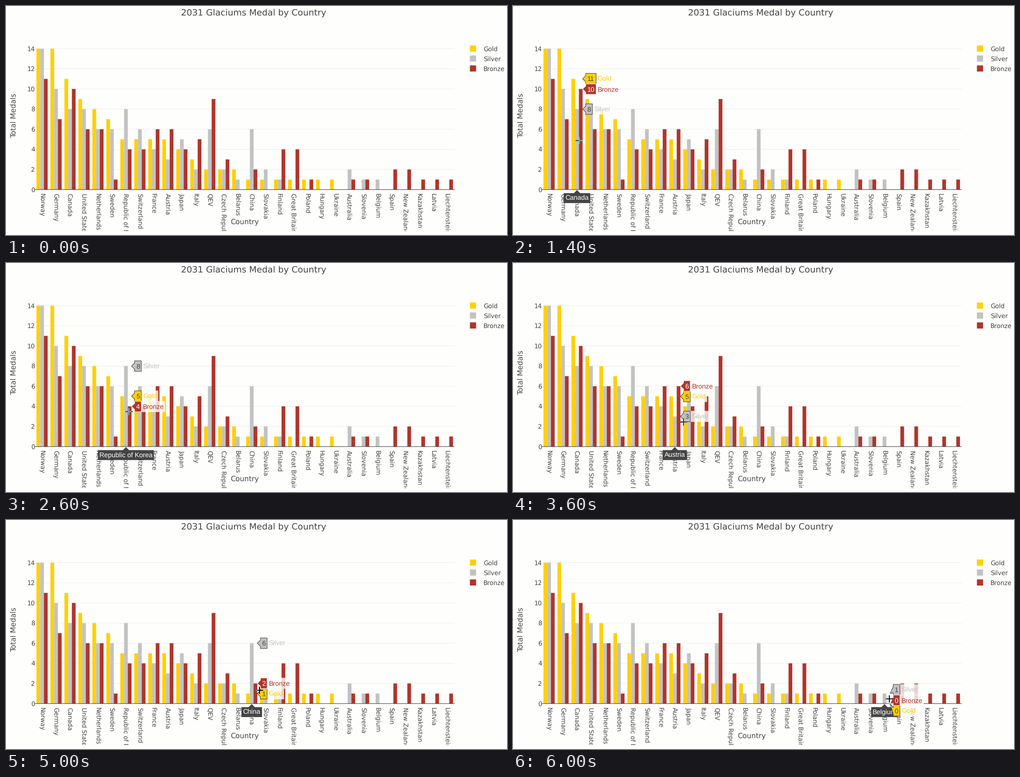
A matplotlib script that plays this animation: 1105x507 px, repeating every 6200 ms.

```python
import numpy as np
import matplotlib.pyplot as plt
from matplotlib.animation import FuncAnimation
from matplotlib.collections import LineCollection
from matplotlib.colors import to_rgb
from matplotlib.patches import Polygon, Rectangle
from matplotlib.textpath import TextPath

W, H, DPI = 1105, 507, 64
FRAMES, INTERVAL = 31, 200

PAPER, INK, GRID = "#fefefd", "#444444", "#eeeeee"
MEDALS = [("Gold", "#ffd005"), ("Silver", "#c2c2c2"), ("Bronze", "#b0352b")]
RESULTS = [
    ("Norway", 14, 14, 11), ("Germany", 14, 10, 7), ("Canada", 11, 8, 10),
    ("United States", 9, 8, 6), ("Netherlands", 8, 6, 6), ("Sweden", 7, 6, 1),
    ("Republic of Korea", 5, 8, 4), ("Switzerland", 5, 6, 4),
    ("France", 5, 4, 6), ("Austria", 5, 3, 6), ("Japan", 4, 5, 4),
    ("Italy", 3, 2, 5), ("QEV", 2, 6, 9), ("Czech Republic", 2, 2, 3),
    ("Belarus", 2, 1, 0), ("China", 1, 6, 2), ("Slovakia", 1, 2, 0),
    ("Finland", 1, 1, 4), ("Great Britain", 1, 0, 4), ("Poland", 1, 0, 1),
    ("Hungary", 1, 0, 0), ("Ukraine", 1, 0, 0), ("Australia", 0, 2, 1),
    ("Slovenia", 0, 1, 1), ("Belgium", 0, 1, 0), ("Spain", 0, 0, 2),
    ("New Zealand", 0, 0, 2), ("Kazakhstan", 0, 0, 1), ("Latvia", 0, 0, 1),
    ("Liechtenstein", 0, 0, 1),
]

LEFT, RIGHT, BASE, UNIT = 64.1, 989, 406.5, 312 / 14
STEP = (RIGHT - LEFT) / len(RESULTS)
BAR = STEP * 0.8 / 3

# Hover labels: font size, padding, arrow size and label height.
HOVER, PAD, ARROW, TALL = 14.7, 3.4, 6.8, 23.3

# Pointer stops: time step, x, y, hovered country.
STOPS = np.array([
    (2, 74, 284, 0), (4, 80, 287, 0), (9, 190, 305, 4), (13, 271, 329, 6),
    (18, 376, 352, 9), (25, 559, 377, 15), (30, 830, 396, 24),
])

# Unhinted glyphs keep fractional letter spacing.
plt.rcParams["text.hinting"] = "no_hinting"

fig = plt.figure(figsize=(W / DPI, H / DPI), dpi=DPI, facecolor=PAPER)
ax = fig.add_axes([0, 0, 1, 1])
ax.set_xlim(0, W)
ax.set_ylim(H, 0)
ax.axis("off")


def points(px):
    return px * 72 / DPI


def write(x, y, text, size, color=INK, family="DejaVu Sans", z=4, **kw):
    return ax.text(x, y, text, fontsize=points(size), color=color,
                   family=family, va="baseline", rotation_mode="anchor",
                   zorder=z, **kw)


def box(x, y, w, h, color, z, **kw):
    return ax.add_patch(Rectangle((x, y), w, h, facecolor=color, lw=0,
                                  zorder=z, snap=False, **kw))


def center(i):
    return LEFT + STEP * (i + 0.5)


def level(value):
    return BASE - UNIT * value


def draw_chart():
    write(546.5, 21, "2031 Glaciums Medal by Country", 19.2, ha="center")
    write(526.5, 484, "Country", 15.8, ha="center")
    write(21.5, 243, "Total Medals", 16, ha="center", rotation=90)

    for value in range(0, 15, 2):
        y = level(value)
        write(63.5, y + 5, str(value), 13.6, ha="right")
        ax.plot([LEFT, RIGHT], [y, y], color=INK if value == 0 else GRID,
                lw=points(1.13), zorder=3 if value == 0 else 1, snap=False)

    view = Rectangle((0, 0), W, 498, transform=ax.transData)
    for i, (country, *counts) in enumerate(RESULTS):
        label = write(center(i) - 5.3, 415, country, 13.55, rotation=270,
                      ha="left", clip_on=True)
        label.set_clip_path(view)
        for k, count in enumerate(counts):
            if count:
                box(center(i) + (k - 1.5) * BAR, level(count), BAR,
                    UNIT * count, MEDALS[k][1], 2)

    for k, (medal, color) in enumerate(MEDALS):
        y = 94.3 + 22 * k
        box(1023.2, y - 6.8, 13.6, 13.6, color, 2)
        write(1053, y + 5, medal, 13.6)


def text_width(text):
    path = TextPath((0, 0), text, size=HOVER, prop={"family": "Liberation Sans"})
    return path.get_extents().width + 1


def hover_text(x, y, text, color, z, ha="center"):
    return write(x, y + 5.3, text, HOVER, color, "Liberation Sans", z, ha=ha)


def spread(counts):
    """Label heights, with overlapping labels pushed apart around their mean."""
    order = sorted(range(3), key=lambda k: (-counts[k], -k))
    groups = []
    for rank, k in enumerate(order):
        groups.append([level(counts[k]) - TALL * rank])
        while len(groups) > 1 and np.mean(groups[-2]) > np.mean(groups[-1]):
            last = groups.pop()
            groups[-1] += last
    flat = [np.mean(g) for g in groups for _ in g]
    return {k: flat[rank] + TALL * rank for rank, k in enumerate(order)}


def country_label(i):
    x, name = center(i), RESULTS[i][0]
    half = text_width(name) / 2 + PAD
    top, bottom = BASE + ARROW + 1, BASE + ARROW + 23
    shape = [(x, BASE + 1), (x + ARROW, top), (x + half, top),
             (x + half, bottom), (x - half, bottom), (x - half, top),
             (x - ARROW, top)]
    patch = ax.add_patch(Polygon(shape, facecolor=INK, lw=0, zorder=10,
                                 snap=False))
    return [patch, hover_text(x, 425, name, "white", 11)]


def medal_label(x, count, y, k):
    medal, color = MEDALS[k]
    z = 12 + 3 * k
    dark = k < 2
    tip = level(count)
    x0 = x + ARROW
    wide = text_width("0" * len(str(count))) + 2 * PAD
    x1 = x0 + wide
    top, bottom = y - TALL / 2, y + TALL / 2
    shape = [(x, tip), (x0, y + ARROW), (x0, bottom), (x1, bottom),
             (x1, top), (x0, top), (x0, y - ARROW)]
    back = box(x1, top - 0.5, text_width(medal) + 2 * PAD, TALL + 1,
               PAPER, z, alpha=0.8)
    flag = ax.add_patch(Polygon(shape, facecolor=color, lw=points(1.13),
                                edgecolor=INK if dark else PAPER,
                                zorder=z + 1, snap=False))
    return [back, flag,
            hover_text(x0 + wide / 2, y, str(count),
                       INK if dark else "white", z + 2),
            hover_text(x1 + PAD, y, medal, color, z + 2, "left")]


def color_at(x, y):
    for i, (_, *counts) in enumerate(RESULTS):
        k = int(np.floor((x - center(i)) / BAR + 1.5))
        if 0 <= k < 3 and level(counts[k]) <= y < BASE:
            return MEDALS[k][1]
    return PAPER


def pointer(x, y):
    """Crosshair that inverts the colours of the bars below it."""
    cells = []
    for d in range(-8, 8):
        cells.append([(x + d, y), (x + d + 1, y)])
        cells.append([(x, y + d), (x, y + d + 1)])
    colors = [[1 - c for c in to_rgb(color_at(*np.mean(cell, axis=0)))]
              for cell in cells]
    cross = LineCollection(cells, colors=colors, linewidths=points(2),
                           capstyle="butt", antialiased=False, zorder=30)
    cross.set_snap(False)
    return ax.add_collection(cross, autolim=False)


shown = []


def draw(step):
    while shown:
        shown.pop().remove()
    if step < STOPS[0, 0]:
        return
    x, y, i = (np.interp(step, STOPS[:, 0], STOPS[:, c]) for c in (1, 2, 3))
    i = int(round(i))
    counts = RESULTS[i][1:]
    shown.extend(country_label(i))
    heights = spread(counts)
    for k in range(3):
        shown.extend(medal_label(center(i) + 1.5 * BAR, counts[k], heights[k], k))
    shown.append(pointer(round(x), round(y)))


draw_chart()
anim = FuncAnimation(fig, draw, frames=FRAMES, interval=INTERVAL,
                     init_func=lambda: None, repeat=True, repeat_delay=0,
                     blit=False, cache_frame_data=False)
plt.show()
```
